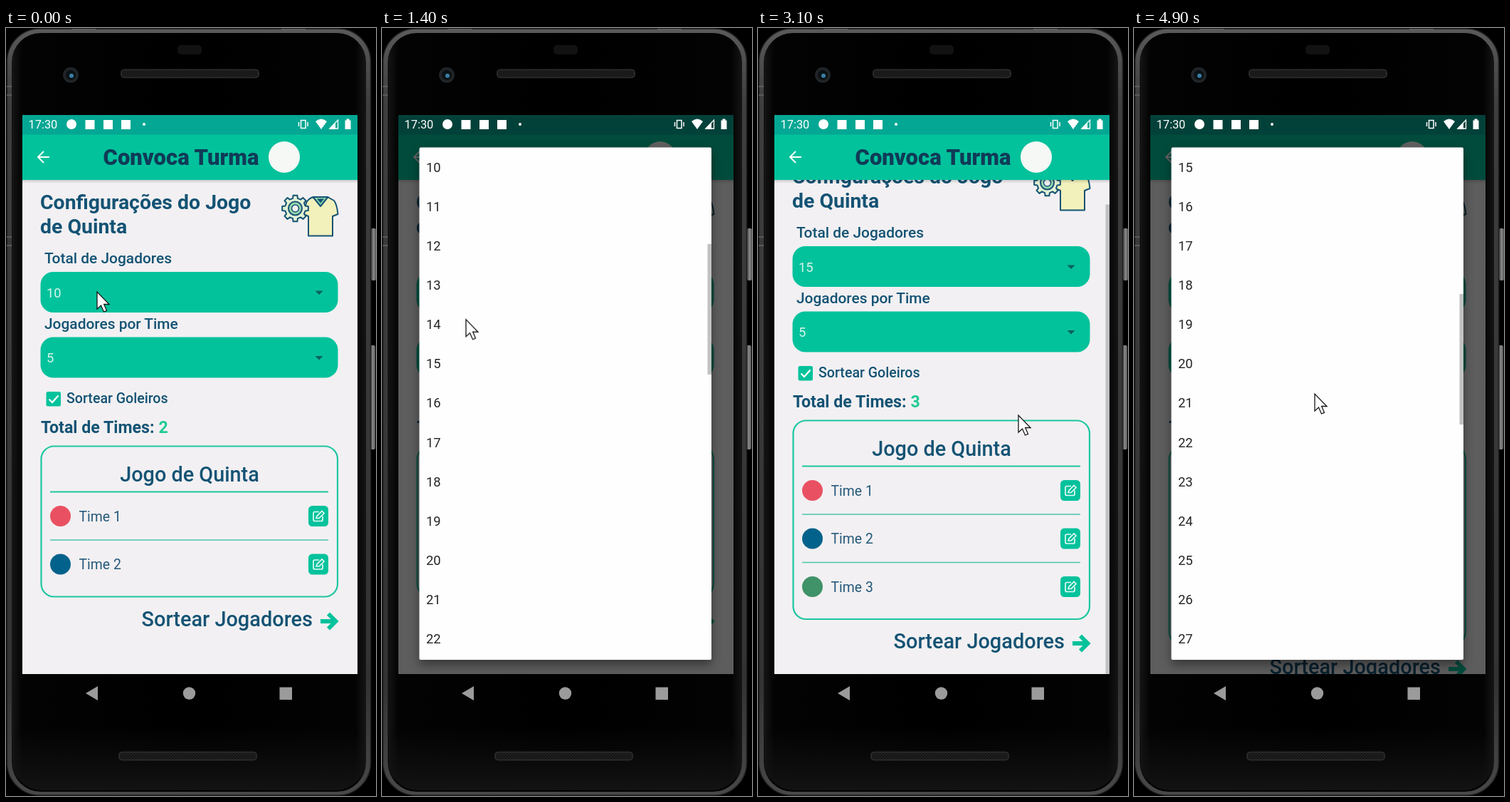
Recreate the animation shown at these times as an HTML page. Size 520x1077 px, loop 5 s.

```html
<!DOCTYPE html>
<html lang="pt-BR">
<head>
<meta charset="utf-8">
<title>Configurações</title>
<style>
html, body { margin: 0; width: 100%; height: 100%; overflow: hidden; background: #000; }
svg { display: block; width: 100%; height: 100%; }
text { font-family: Roboto, sans-serif; fill: #145374; }
.medium { font-weight: 500; }
.bold { font-weight: 700; }
.value { font-size: 18.3px; fill: #d8f5ec; }
.item { font-size: 18.4px; fill: #262626; }
.team { font-size: 19.4px; fill: #25597a; }

/* One loop is 5 s, so 2% is one 100 ms step. */
.anim { animation: 5s step-end infinite; }
.ten { animation-name: hide-ten; }
.fifteen { opacity: 0; animation-name: show-fifteen; }
.two { animation-name: hide-two; }
.three { opacity: 0; animation-name: show-three; }
.draw { animation-name: push; }
.page { animation-name: scroll; }
.thumb { animation-name: thumb, thumb-fade; opacity: 0; }
.dim { opacity: 0; animation-name: dim; }
.first { opacity: 0; animation-name: first; }
.second { opacity: 0; animation-name: second; }
.ripple { transform: scale(0); transform-origin: 258px 471px; animation-name: ripple; }
.cursor { animation-name: cursor; }

@keyframes hide-ten { 42% { opacity: 0; } }
@keyframes show-fifteen { 42% { opacity: 1; } }
@keyframes hide-two { 48% { opacity: 0; } }
@keyframes show-three { 48% { opacity: 1; } }
@keyframes push { 0% { transform: translateY(0); } 48%, 100% { transform: translateY(67px); } }
@keyframes scroll {
  0% { transform: translateY(0); }
  56% { transform: translateY(0); animation-timing-function: steps(3); }
  62% { transform: translateY(-36px); }
  76% { transform: translateY(-36px); animation-timing-function: steps(3); }
  82%, 100% { transform: translateY(0); }
}
@keyframes thumb {
  0% { transform: translateY(0); }
  56% { transform: translateY(0); animation-timing-function: steps(3); }
  62% { transform: translateY(35px); }
  76% { transform: translateY(35px); animation-timing-function: steps(3); }
  82%, 100% { transform: translateY(0); }
}
@keyframes thumb-fade {
  0% { opacity: 0; }
  58% { opacity: 1; }
  68% { opacity: .5; }
  70% { opacity: 0; }
  76% { opacity: 1; }
  88% { opacity: .4; }
  90%, 100% { opacity: 0; }
}
@keyframes dim {
  0% { opacity: 0; }
  14% { opacity: .3; }
  16% { opacity: .52; }
  18% { opacity: .61; }
  42% { opacity: .3; }
  44% { opacity: 0; }
  92% { opacity: .25; }
  94% { opacity: .48; }
  96%, 100% { opacity: .61; }
}
@keyframes first {
  0% { opacity: 0; }
  14% { opacity: .5; }
  16% { opacity: 1; }
  42% { opacity: .5; }
  44%, 100% { opacity: 0; }
}
@keyframes second {
  0% { opacity: 0; }
  92% { opacity: .5; }
  94%, 100% { opacity: 1; }
}
@keyframes ripple {
  0% { transform: scale(0); }
  36% { transform: scale(0); animation-timing-function: steps(3); }
  42%, 100% { transform: scale(1); }
}
@keyframes cursor {
  0% { transform: translate(128px, 370px); }
  26% { transform: translate(128px, 370px); animation-timing-function: steps(3); }
  32% { transform: translate(98px, 486px); animation-timing-function: steps(2); }
  36% { transform: translate(95px, 464px); }
  42% { transform: translate(102px, 468px); }
  44% { transform: translate(109px, 471px); }
  48% { transform: translate(109px, 471px); animation-timing-function: steps(4); }
  56% { transform: translate(366px, 579px); animation-timing-function: steps(3); }
  62% { transform: translate(366px, 543px); }
  66% { transform: translate(366px, 543px); animation-timing-function: steps(4); }
  74% { transform: translate(241px, 314px); }
  76% { transform: translate(241px, 314px); animation-timing-function: steps(3); }
  82% { transform: translate(241px, 350px); }
  94% { transform: translate(241px, 350px); animation-timing-function: steps(2); }
  98%, 100% { transform: translate(254px, 513px); }
}
</style>
</head>
<body>
<svg viewBox="0 0 520 1077">
  <defs>
    <linearGradient id="rim" x2="0" y2="1">
      <stop offset="0" stop-color="#5a5a5a"/><stop offset=".1" stop-color="#3e3e3e"/>
      <stop offset=".85" stop-color="#333"/><stop offset="1" stop-color="#484848"/>
    </linearGradient>
    <linearGradient id="glass" x2="1" y2="0">
      <stop offset="0" stop-color="#151515"/><stop offset=".03" stop-color="#030303"/>
      <stop offset=".5" stop-color="#000"/><stop offset=".97" stop-color="#030303"/>
      <stop offset="1" stop-color="#151515"/>
    </linearGradient>
    <linearGradient id="chin" x2="0" y2="1">
      <stop offset="0" stop-color="#111" stop-opacity="0"/><stop offset="1" stop-color="#131313"/>
    </linearGradient>
    <linearGradient id="key" x2="1" y2="0">
      <stop offset="0" stop-color="#3c3c3c"/><stop offset=".5" stop-color="#8a8a8a"/><stop offset="1" stop-color="#555"/>
    </linearGradient>
    <linearGradient id="edge" x2="0" y2="1">
      <stop offset="0" stop-opacity=".16"/><stop offset="1" stop-opacity="0"/>
    </linearGradient>
    <pattern id="mesh" width="4" height="4" patternUnits="userSpaceOnUse">
      <path d="M0 4L4 0" stroke="#292929" stroke-width="1"/>
    </pattern>
    <filter id="lift" x="-10%" y="-5%" width="120%" height="112%">
      <feDropShadow dx="0" dy="7" stdDeviation="7" flood-opacity=".4"/>
    </filter>
    <clipPath id="screen"><rect x="23" y="122" width="471" height="784"/></clipPath>
    <clipPath id="body"><rect x="23" y="213" width="471" height="693"/></clipPath>
    <clipPath id="row"><rect x="53" y="443" width="410" height="55"/></clipPath>
  </defs>

  <rect width="520" height="1077" fill="#000"/>
  <g fill="url(#key)">
    <rect x="513" y="281" width="7" height="73" rx="2"/>
    <rect x="512" y="445" width="7" height="146" rx="2"/>
  </g>
  <rect x="1.500" y="1" width="511" height="1075" rx="46" fill="url(#rim)" stroke="#222" stroke-width="1.500"/>
  <rect x="8" y="7" width="498" height="1064" rx="41" fill="url(#glass)"/>
  <rect x="10" y="980" width="494" height="89" rx="40" fill="url(#chin)"/>
  <path d="M1 82h7M1 94h7M1 293h7M1 305h7M92 2h34M387 2h34" stroke="#666" stroke-width="1.500"/>
  <rect x="241" y="24" width="34" height="13" rx="5" fill="#121212"/>
  <circle cx="91" cy="66" r="11" fill="#202427"/>
  <circle cx="91" cy="66" r="7" fill="#0b1117"/>
  <circle cx="92" cy="67" r="3" fill="#3b7ea3"/>
  <g stroke="#2b2b2b" stroke-width="1.500">
    <rect x="162" y="58.500" width="193" height="11" rx="4" fill="#151515"/>
    <rect x="162" y="58.500" width="193" height="11" rx="4" fill="url(#mesh)"/>
    <rect x="159" y="1015.500" width="193" height="11" rx="4" fill="#151515"/>
    <rect x="159" y="1015.500" width="193" height="11" rx="4" fill="url(#mesh)"/>
  </g>
  <g fill="#9b9b9b">
    <path d="M112 933L129 923V943Z"/>
    <circle cx="257.500" cy="933" r="8.700"/>
    <rect x="384.500" y="924.500" width="17.500" height="17.500"/>
  </g>

  <g clip-path="url(#screen)">
    <rect x="23" y="122" width="471" height="785" fill="#f2f0f2"/>
    <g clip-path="url(#body)">
      <g class="anim page">
        <text class="bold" font-size="28.4" x="48" y="254">Configurações do Jogo</text>
        <text class="bold" font-size="28.4" x="48" y="288">de Quinta</text>

        <g stroke="#145374" stroke-width="2" stroke-linejoin="round">
          <path fill="#f2f0bb" d="M432 237Q425 239 422 245L418 261L425 264V291.500H459V264L466.500 261Q465 247 461 242L452 237Q442 241 432 237Z"/>
          <path fill="#8fd6ac" d="M431.500 237H452.500L442 250Z"/>
          <path fill="#145374" stroke="none" d="M437 239.500H447L442 245.500Z"/>
          <path id="gear" fill="#e4f1d4"/>
          <circle cx="406.500" cy="253" r="9.500" fill="#9ad6b0"/>
          <circle cx="406.500" cy="253" r="5" fill="#f2f0f2" stroke-width="1.500"/>
        </g>

        <text class="medium" font-size="20.9" x="54" y="330">Total de Jogadores</text>
        <text class="medium" font-size="20.9" x="54" y="421.500">Jogadores por Time</text>
        <g fill="#02c29c">
          <rect x="48.500" y="342" width="418" height="57" rx="18"/>
          <rect x="48.500" y="433.500" width="418" height="57" rx="18"/>
        </g>
        <path fill="#0b6258" d="M434.500 368.500h11l-5.500 5.500zM434.500 460h11l-5.500 5.500z"/>
        <text class="value anim ten" x="57" y="377.500">10</text>
        <text class="value anim fifteen" x="57" y="377.500">15</text>
        <text class="value" x="57" y="469">5</text>

        <rect x="56.500" y="510" width="20.500" height="20.500" rx="2.500" fill="#02c29c"/>
        <path d="M60.500 520.500L65 525L73.500 515.500" fill="none" stroke="#fff" stroke-width="2.300"/>
        <text class="medium" font-size="19.6" x="85" y="526">Sortear Goleiros</text>

        <text class="bold" font-size="23.2" x="49" y="567.500">Total de Times:</text>
        <text class="bold anim two" font-size="23.2" x="214.500" y="567.500" style="fill:#20cb96">2</text>
        <text class="bold anim three" font-size="23.2" x="214.500" y="567.500" style="fill:#20cb96">3</text>

        <g fill="none" stroke="#1cc6a0" stroke-width="2.200">
          <rect class="anim two" x="49.500" y="586.500" width="416.500" height="211" rx="18"/>
          <rect class="anim three" x="49.500" y="586.500" width="416.500" height="278.500" rx="18"/>
          <path d="M62 650.500H453"/>
        </g>
        <text class="medium" font-size="28.8" x="258" y="635.500" text-anchor="middle">Jogo de Quinta</text>
        <g id="teams"></g>

        <g class="anim draw">
          <text class="medium" font-size="28.9" x="190.500" y="838.500">Sortear Jogadores</text>
          <path d="M442 832H463M453 821.500L463.500 832L453 842.500" fill="none" stroke="#02c29c" stroke-width="5.800"/>
        </g>
      </g>
      <rect class="anim thumb" x="488.500" y="212.500" width="5.500" height="659" fill="#c1c0c2"/>
      <rect x="23" y="213" width="471" height="5" fill="url(#edge)"/>
    </g>

    <rect x="23" y="149" width="471" height="64" fill="#02c29c"/>
    <rect x="23" y="122" width="471" height="27.500" fill="#04a793"/>
    <path d="M61 181H45M53 173L45 181L53 189" fill="none" stroke="#fff" stroke-width="2"/>
    <text x="246" y="191.500" text-anchor="middle" font-size="31" font-weight="900" style="fill:#0f3b57">Convoca Turma</text>
    <circle cx="391" cy="181" r="22" fill="#f6f8f6"/>

    <rect class="anim dim" x="23" y="122" width="471" height="785"/>

    <g fill="#fff">
      <text x="31.500" y="141" font-size="16.4" style="fill:#fff">17:30</text>
      <circle cx="92" cy="135" r="7"/>
      <path d="M111.500 129h13v13h-13zM137 129h13v13h-13zM162 129h13v13h-13z"/>
      <circle cx="194" cy="135" r="2"/>
      <path d="M414.500 129.500h6.500v11h-6.500zM411.500 132v6M424 132v6" fill="none" stroke="#fff" stroke-width="1.500"/>
      <path d="M435 131Q443 124 451 131L443 142Z"/>
      <path d="M455 141L466.500 129V141Z" fill="none" stroke="#fff" stroke-width="1.300"/>
      <path d="M454 142L463 133V142Z"/>
      <path d="M476.500 129.500h2v-2h4v2h2v12.500h-8z"/>
    </g>
    <g id="dialogs"></g>
  </g>

  <path class="anim cursor" d="M0 0V24L5.500 19L9.500 28L13.500 26.300L9.700 17.500H17Z" fill="#fff" stroke="#161616" stroke-width="1.300"/>
</svg>
<script>
const byId = id => document.getElementById(id);

function gear(cx, cy, teeth, inner, outer) {
  const point = (r, turn) => {
    const a = turn * 2 * Math.PI / teeth;
    return (cx + r * Math.sin(a)).toFixed(1) + ' ' + (cy - r * Math.cos(a)).toFixed(1);
  };
  const points = [];
  for (let i = 0; i < teeth; i++) {
    points.push(point(inner, i - .3), point(outer, i - .2), point(outer, i + .2), point(inner, i + .3));
  }
  return 'M' + points.join('L') + 'Z';
}

function team(color, i) {
  const y = 684.5 + i * 67.5;
  return `<g class="${i === 2 ? 'anim three' : ''}">
    ${i ? `<path d="M62 ${y - 34}H453" stroke="#4cc5ad" stroke-width="1.500"/>` : ''}
    <circle cx="76.500" cy="${y}" r="14.500" fill="${color}"/>
    <text class="team" x="102.500" y="${y + 7}">Time ${i + 1}</text>
    <rect x="425" y="${y - 14.5}" width="28" height="29" rx="5.500" fill="#02c29c"/>
    <g transform="translate(439 ${y})" fill="none" stroke="#e8faf4" stroke-width="1.700">
      <path d="M1-6H-5Q-7-6-7-4V5Q-7 7-5 7H4Q6 7 6 5V0"/>
      <path d="M-3 3L-2 0L5-7L8-4L1 3Z"/>
    </g></g>`;
}

function dialog(name, start, thumbY, extra = '') {
  let items = '';
  for (let i = 0; i < 13; i++) {
    items += `<text class="item" x="62" y="${202 + i * 55.08}">${start + i}</text>`;
  }
  return `<g class="anim ${name}">
    <rect x="52.500" y="167.500" width="410.500" height="718.500" rx="2" fill="#fefefe" filter="url(#lift)"/>
    ${extra}${items}
    <rect x="457.500" y="${thumbY}" width="5.500" height="183" fill="#c2c2c2"/></g>`;
}

const ripple = `<g clip-path="url(#row)"><circle class="anim ripple" cx="258" cy="471" r="206" fill="#e8e8e9"/></g>`;

byId('gear').setAttribute('d', gear(406.5, 253, 8, 14.5, 18.5));
byId('teams').innerHTML = ['#e95162', '#03628b', '#409268'].map(team).join('');
byId('dialogs').innerHTML = dialog('first', 10, 303, ripple) + dialog('second', 15, 373);
</script>
</body>
</html>
```
